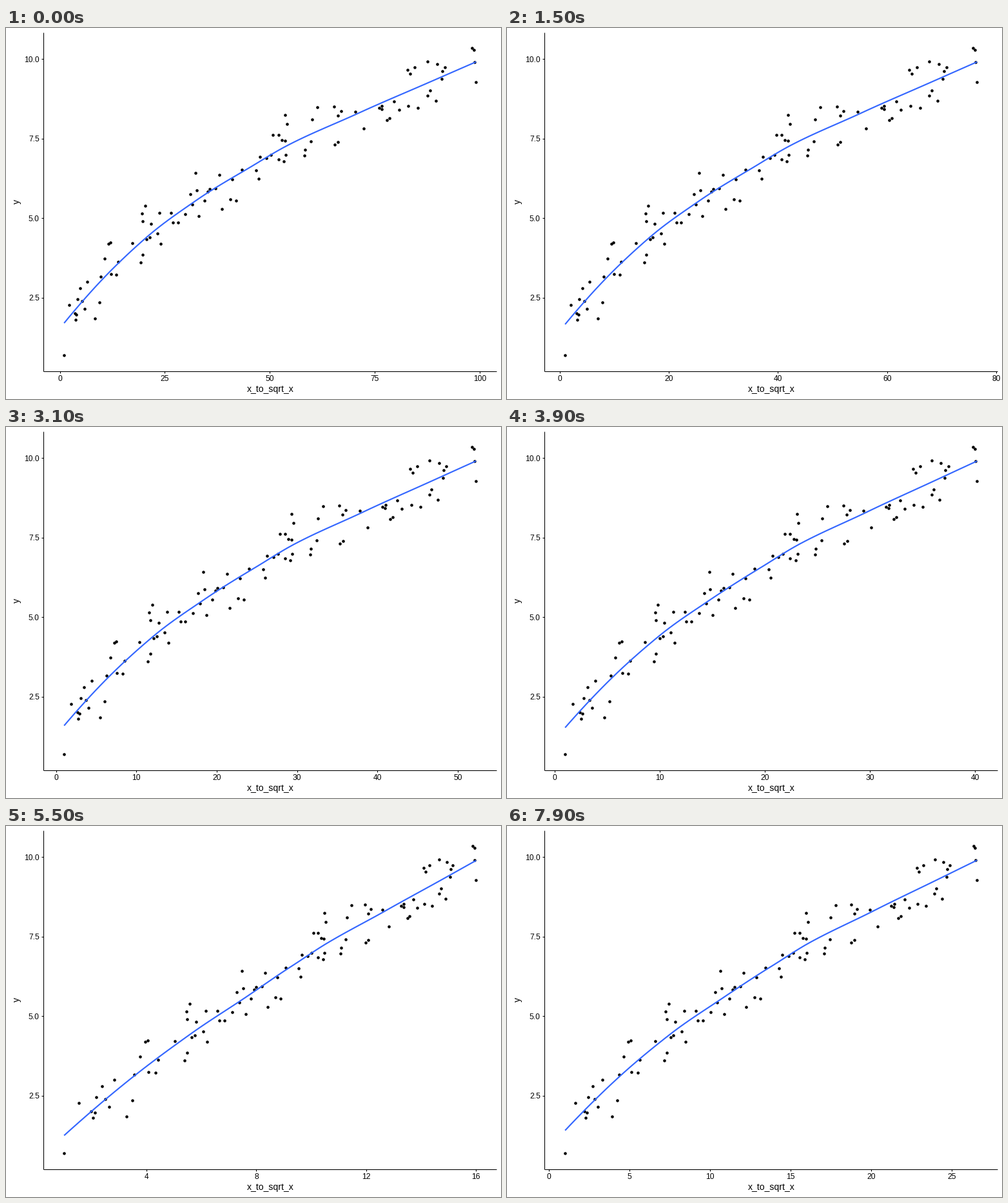
A matplotlib script that plays this animation: 768 px wide and 576 px high, repeating every 8 s.

```python
import math

import matplotlib.pyplot as plt
import numpy as np
from matplotlib.animation import FuncAnimation

PT = 0.75  # points per pixel at 96 dpi
LEFT, RIGHT, TOP, BOTTOM = 58.2, 761.3, 7, 532.5
STEPS, HOLD, FRAMES = 59, 9, 80
MAX_TICKS = 10
plt.rcParams["font.family"] = "Liberation Sans"

X = np.array([
    1.0, 2.21, 3.51, 3.71, 3.93, 4.15, 4.88, 5.26, 5.84, 6.53,
    8.36, 9.38, 9.72, 10.66, 11.53, 12.01, 12.14, 13.47, 13.88, 17.26,
    19.25, 19.54, 19.77, 19.77, 20.27, 20.63, 21.33, 21.7, 23.2, 23.73,
    24.08, 26.47, 26.87, 28.08, 29.92, 31.04, 31.55, 32.28, 32.56, 33.14,
    34.45, 35.18, 35.7, 37.1, 38.0, 38.58, 40.62, 41.08, 42.0, 43.35,
    46.7, 47.3, 47.64, 49.2, 50.3, 50.76, 52.05, 52.06, 52.9, 53.37,
    53.6, 53.68, 53.83, 54.1, 58.24, 58.45, 59.8, 60.07, 61.3, 65.35,
    65.46, 66.16, 66.2, 66.98, 70.37, 72.31, 76.02, 76.65, 76.75, 77.9,
    78.56, 79.6, 80.8, 82.8, 83.04, 83.44, 84.58, 85.35, 87.56, 87.62,
    88.13, 89.6, 89.96, 90.9, 91.1, 91.8, 98.15, 98.58, 98.73, 99.15])
Y = np.array([
    0.69, 2.28, 2.01, 1.81, 1.97, 2.45, 2.80, 2.40, 2.16, 3.00,
    1.85, 2.35, 3.16, 3.73, 4.20, 4.24, 3.25, 3.22, 3.63, 4.22,
    3.61, 5.16, 4.91, 3.86, 5.39, 4.34, 4.40, 4.83, 4.52, 5.18,
    4.20, 5.18, 4.87, 4.87, 5.13, 5.76, 5.44, 6.43, 5.88, 5.07,
    5.55, 5.83, 5.92, 5.94, 6.36, 5.29, 5.60, 6.23, 5.56, 6.52,
    6.50, 6.25, 6.94, 6.90, 7.00, 7.62, 6.84, 7.62, 7.46, 6.78,
    7.43, 8.25, 6.99, 7.96, 6.98, 7.16, 7.42, 8.10, 8.48, 8.51,
    7.32, 8.23, 7.39, 8.37, 8.34, 7.82, 8.47, 8.43, 8.53, 8.09,
    8.14, 8.68, 8.41, 9.66, 8.53, 9.54, 9.74, 8.46, 8.85, 9.93,
    9.01, 8.69, 9.85, 9.38, 9.62, 9.74, 10.35, 10.28, 9.91, 9.27])


def blend(i):
    """Share of sqrt(x) in the horizontal position."""
    if i <= STEPS:
        return i / STEPS
    return 1 - max(0, i - STEPS - HOLD) / STEPS


def cuts(x, lo, hi, cell=15):
    """Median cuts of the sorted data down to small cells."""
    if hi - lo <= cell:
        return []
    mid = (lo + hi + 1) // 2
    edge = (x[mid - 1] + x[mid]) / 2
    return cuts(x, lo, mid, cell) + [edge] + cuts(x, mid, hi, cell)


def local_fit(x, at, span=0.75):
    """Value and slope of a tricube-weighted quadratic."""
    d = np.abs(x - at)
    h = np.sort(d)[int(len(x) * span) - 1]
    w = np.clip(1 - (d / h) ** 3, 0, None) ** 3
    _, slope, value = np.polyfit(x - at, Y, 2, w=np.sqrt(w))
    return value, slope


def loess(x, n=80):
    pad = 0.005 * (x[-1] - x[0])
    knots = np.array([x[0] - pad, *cuts(x, 0, len(x)), x[-1] + pad])
    v, s = np.array([local_fit(x, k) for k in knots]).T
    gx = np.linspace(x[0], x[-1], n)
    c = np.clip(np.searchsorted(knots, gx) - 1, 0, len(knots) - 2)
    h = knots[c + 1] - knots[c]
    t = (gx - knots[c]) / h
    gy = ((1 + 2 * t) * (1 - t) ** 2 * v[c] + t * t * (3 - 2 * t) * v[c + 1]
          + h * t * (1 - t) * ((1 - t) * s[c] - t * s[c + 1]))
    return gx, gy


def breaks(lo, hi, m=5):
    """Extended Wilkinson tick positions."""
    span = hi - lo
    best, ticks = -2, []
    for j in (1, 2):
        for rank, q in enumerate((1, 5, 2, 2.5, 4, 3)):
            for k in range(2, 11):
                z0 = math.ceil(math.log10(span / (k + 1) / j / q))
                for z in (z0, z0 + 1):
                    step = j * q * 10.0 ** z
                    first = math.floor(hi / step) * j - (k - 1) * j
                    last = math.ceil(lo / step) * j
                    for start in range(first, last + 1):
                        a = start * step / j
                        b = a + step * (k - 1)
                        zero = start % j == 0 and a <= 0 <= b
                        simple = 1 - rank / 5 - j + zero
                        cover = 1 - 50 * ((hi - b) ** 2 + (lo - a) ** 2) / span ** 2
                        r = (k - 1) / (b - a) * (max(b, hi) - min(a, lo)) / (m - 1)
                        dense = 2 - max(r, 1 / r)
                        score = 0.25 * simple + 0.2 * cover + 0.5 * dense + 0.05
                        if score > best + 1e-12:
                            best = score
                            ticks = [a + step * n for n in range(k)]
    return ticks


def to_py(y):
    return 542.6 - 49.43 * y


fig = plt.figure(figsize=(8, 6), dpi=96, facecolor="white")
ax = fig.add_axes([0, 0, 1, 1])
ax.set(xlim=(0, 768), ylim=(576, 0))
ax.axis("off")


def line(xs, ys, width=1.07, color="black", **kw):
    return ax.plot(xs, ys, color=color, lw=width * PT,
                   solid_capstyle="butt", **kw)[0]


def label(x, y, text="", size=12, **kw):
    kw = {"ha": "center", "va": "baseline", **kw}
    return ax.text(x, y, text, fontsize=size * PT, **kw)


line([LEFT, LEFT], [TOP, BOTTOM + 0.5])
line([LEFT - 0.5, RIGHT], [BOTTOM, BOTTOM])
for y in (2.5, 5, 7.5, 10):
    line([LEFT - 3.5, LEFT], [to_py(y)] * 2)
    label(51.8, to_py(y) + 4.4, f"{y:.1f}", ha="right")
label((LEFT + RIGHT) / 2, 565, "x_to_sqrt_x", 14)
label(20.5, (TOP + BOTTOM) / 2, "y", 14, rotation=90, rotation_mode="anchor")

dots = ax.plot([], [], "o", color="black", ms=4.6 * PT, mew=0)[0]
curve = line([], [], 2.13, "#3366FF")
marks = [line([], []) for _ in range(MAX_TICKS)]
names = [label(0, 548.3) for _ in range(MAX_TICKS)]


def draw(i):
    a = blend(i)
    x = (1 - a) * X + a * np.sqrt(X)
    pad = (RIGHT - LEFT) / 22
    scale = (RIGHT - LEFT - 2 * pad) / (x[-1] - x[0])

    def to_px(v):
        return LEFT + pad + (v - x[0]) * scale

    dots.set_data(to_px(x), to_py(Y))
    gx, gy = loess(x)
    curve.set_data(to_px(gx), to_py(gy))

    ticks = [t for t in breaks(x[0], x[-1]) if LEFT <= to_px(t) <= RIGHT]
    places = 0 if all(abs(t - round(t)) < 1e-9 for t in ticks) else 1
    for n, (mark, name) in enumerate(zip(marks, names)):
        shown = n < len(ticks)
        mark.set_visible(shown)
        name.set_visible(shown)
        if shown:
            px = to_px(ticks[n])
            mark.set_data([px, px], [BOTTOM, BOTTOM + 3.5])
            name.set_x(px)
            name.set_text(f"{ticks[n]:.{places}f}")
    return [dots, curve, *marks, *names]


anim = FuncAnimation(fig, draw, frames=FRAMES, interval=100,
                     repeat=True, repeat_delay=0, blit=False)
plt.show()
```
